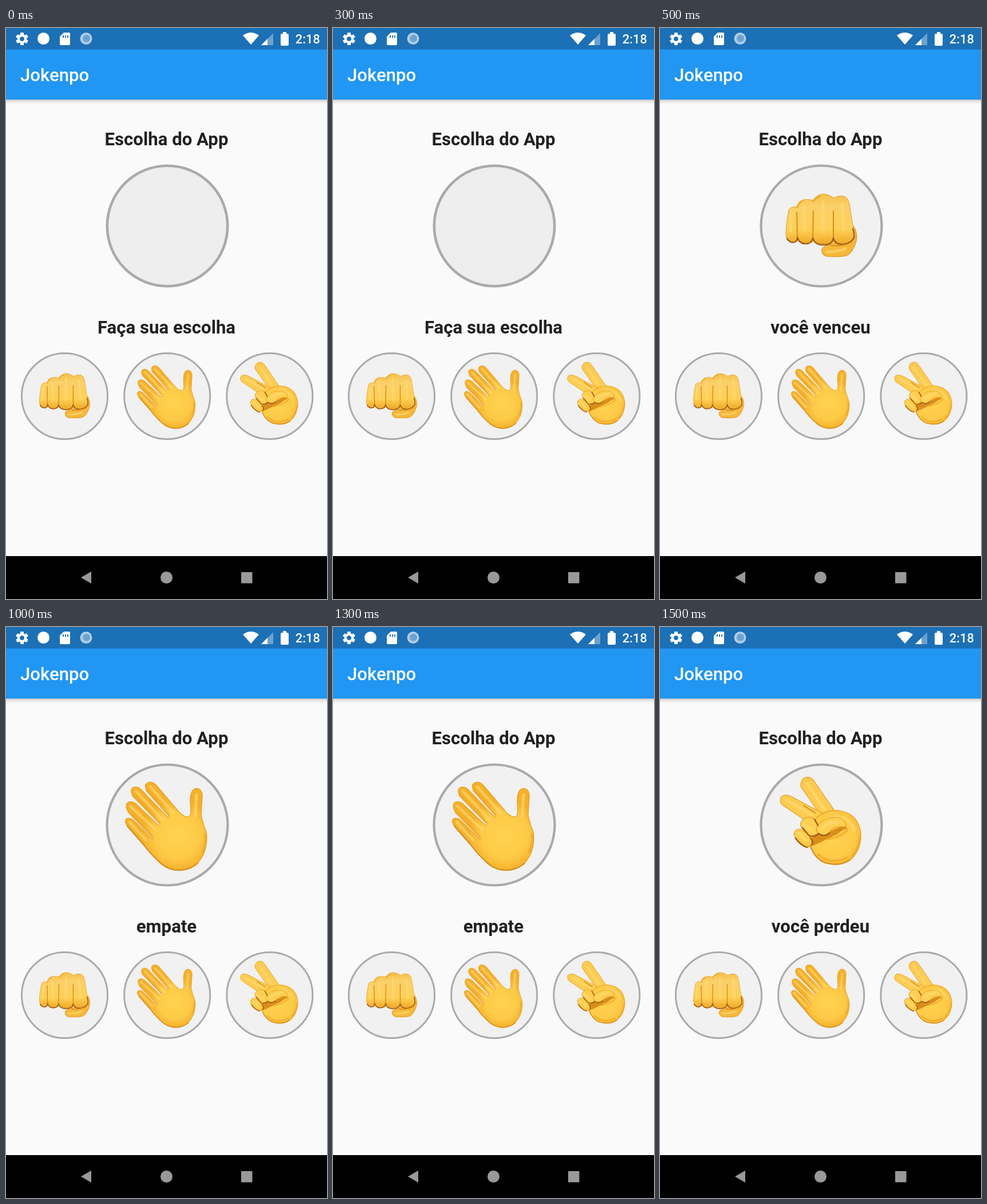
An HTML page that plays this animation: 561x998 px, repeating every 2 s.

```html
<!DOCTYPE html>
<html lang="pt">
<head>
<meta charset="utf-8">
<title>Jokenpo</title>
<style>
  html, body { margin: 0; width: 100%; height: 100%; overflow: hidden; background: #fafafa; }
  svg { display: block; }
  text { font-family: Roboto, sans-serif; }
  .heading { font-size: 31.17px; font-weight: 700; fill: #212121; text-anchor: middle; }
  .skin { fill: url(#skin); stroke: #e59d20; stroke-width: 1.2; stroke-linejoin: round; }
  .line { fill: none; stroke-linecap: round; stroke-linejoin: round; }
  .crease { stroke: #d78d1c; stroke-width: 2; }
  .dark { stroke: #a45f18; stroke-width: 2.4; }
  .glow { stroke: #ffdf7c; stroke-width: 5; opacity: .55; }
  .shade { stroke: #eda322; stroke-width: 4; opacity: .6; }
</style>
</head>
<body>
<svg width="561" height="998" viewBox="0 0 561 998">
  <defs>
    <linearGradient id="skin" gradientUnits="userSpaceOnUse" x1="0" y1="265" x2="0" y2="425">
      <stop offset="0" stop-color="#fbc950"/>
      <stop offset=".6" stop-color="#ffd052"/>
      <stop offset="1" stop-color="#f8b72c"/>
    </linearGradient>
    <linearGradient id="knuckle" x1="0" y1="0" x2="0" y2="1">
      <stop offset="0" stop-color="#f6c04a"/>
      <stop offset=".25" stop-color="#fbd068"/>
      <stop offset=".7" stop-color="#ffd056"/>
      <stop offset="1" stop-color="#eda625"/>
    </linearGradient>
    <radialGradient id="palm" gradientUnits="userSpaceOnUse" cx="300" cy="364" r="62">
      <stop offset="0" stop-color="#ffd34f"/>
      <stop offset=".65" stop-color="#fdca47"/>
      <stop offset="1" stop-color="#f5b02a"/>
    </radialGradient>
    <linearGradient id="drop" x1="0" y1="0" x2="0" y2="1">
      <stop offset="0" stop-color="#000" stop-opacity=".27"/>
      <stop offset=".4" stop-color="#000" stop-opacity=".1"/>
      <stop offset="1" stop-color="#000" stop-opacity="0"/>
    </linearGradient>

    <g id="ring">
      <circle cx="282" cy="346" r="105.5" fill="#f1f1f1" stroke="#aaa" stroke-width="4.2"/>
    </g>

    <g id="rock">
      <use href="#ring"/>
      <path d="M338 346Q346 358 343 372Q338 390 328 397Q320 401 290 399Q280 393 284 385Q288 380 300 378L326 368Z" fill="#f6b83a" stroke="#df941e" stroke-width="1.2"/>
      <path class="line glow" d="M292 391Q313 391 324 386"/>
      <path d="M240 313Q229 311 225 318Q220 345 220 358Q220 372 227 374Q237 377 241 370Q246 378 255 377Q264 377 268 372Q274 380 286 379Q299 379 303 374Q308 378 318 378Q336 377 339 367Q341 358 337 345L331 308Q329 296 321 294Q312 292 304 297Q296 291 286 290Q276 290 268 301Q258 299 251 300Q242 303 240 313Z" fill="url(#knuckle)" stroke="#e6a02a" stroke-width="1"/>
      <path class="line glow" d="M230 325L228 354M252 313L253 354M285 304V356M318 308L321 352"/>
      <path class="line crease" d="M239 322L240 367M268 320L267 369M303 320V371"/>
      <path class="line shade" d="M240 313Q242 305 248 303M268 303Q272 296 279 294"/>
      <path class="line dark" d="M222 368Q228 377 236 374Q240 372 240 366Q244 378 255 377Q265 377 267 367Q271 380 286 379Q301 379 303 367Q306 379 320 378Q334 376 339 367Q340 358 337 351"/>
      <path class="line crease" d="M335 374Q323 382 300 380"/>
    </g>

    <g id="paper">
      <use href="#ring"/>
      <path class="skin" style="fill:url(#palm)" d="M210 345Q206 335 214 334Q220 334 226 341L256 371Q259 370 256 366L213 322Q207 311 214 306Q221 304 227 309L267 347Q271 346 268 342L221 294Q216 284 223 280Q231 278 237 285L282 332Q286 332 284 328L245 285Q241 275 248 272Q256 269 263 277L303 324Q316 336 321 330Q324 326 322 308Q321 284 332 282Q344 282 343 298Q342 312 341 328Q343 340 350 358Q353 375 347 393Q336 420 312 425Q282 429 263 406Q250 393 238 377Z"/>
      <path class="line glow" d="M252 279L293 325M227 287L274 337M217 313L261 354M216 341L245 373M333 293L331 331"/>
      <path class="line crease" d="M212 348L240 380Q252 396 265 408Q283 426 305 425Q324 423 335 413"/>
      <path class="line shade" d="M348 362Q350 380 343 393M214 323L256 367M222 295L268 342M246 286L284 329" stroke-width="2"/>
    </g>

    <g id="scissors">
      <use href="#ring"/>
      <path class="skin" d="M246 279Q245 266 254 263Q263 260 270 270L305 321Q292 334 278 325Z"/>
      <path class="skin" d="M211 307Q208 296 217 294Q224 293 233 298L283 325L272 340L251 336L217 313Q213 311 211 307Z"/>
      <path class="skin" style="fill:url(#palm)" d="M276 331Q296 317 319 322Q347 329 351 360Q352 390 333 407Q315 420 290 413Q271 407 262 382L258 357Z"/>
      <path class="line glow" d="M257 274L287 318M222 303L266 328M305 331Q333 333 340 356"/>
      <path d="M270 354Q286 364 304 354Q324 344 327 352Q319 354 310 362Q294 369 277 378L260 385Z" fill="#d98e1c"/>
      <path class="line shade" d="M291 371Q318 367 328 354M276 397Q298 417 327 403M350 367Q347 388 336 400"/>
      <path class="skin" d="M246 348Q244 339 254 334Q263 330 270 336L281 352Q278 362 266 365L257 367Z"/>
      <path class="skin" d="M235 364Q233 355 243 353Q250 354 263 368Q269 375 264 381Q257 388 249 382Q237 375 235 364Z"/>
      <path class="skin" d="M274 350Q280 337 299 334Q319 329 325 344Q326 351 317 349Q304 348 297 358Q288 368 279 362Q271 357 274 350Z"/>
      <path class="line glow" d="M251 344L264 355M243 361L255 374M283 352Q291 342 311 340"/>
      <path class="line dark" d="M249 351L261 365Q272 368 277 361Q287 368 296 360M263 369Q269 376 265 381M270 336L276 347M237 369Q246 382 257 385"/>
      <path class="line crease" d="M264 386Q274 409 293 413Q316 418 331 407M271 325L251 312"/>
    </g>
  </defs>

  <rect width="561" height="998" fill="#fafafa"/>
  <rect y="124" width="561" height="9" fill="url(#drop)"/>
  <rect width="561" height="125" fill="#2196f3"/>
  <rect width="561" height="37.5" fill="#1c70b6"/>

  <g fill="#fff">
    <g id="gear" transform="translate(28 19)"></g>
    <circle cx="65.500" cy="18.500" r="10.500"/>
    <path d="M101 8H110Q112 8 112 10V28Q112 30 110 30H96Q94 30 94 28V15Z"/>
    <path d="M100 13V17M104 13V17M108 13V17" stroke="#1c70b6" stroke-width="2"/>
    <circle cx="140" cy="18.500" r="10.500" fill="#8fb9dc"/>
    <circle cx="140" cy="18.500" r="8.500" fill="none" stroke="#d5e5f2" stroke-width="3" stroke-dasharray="1.500 1.500"/>
    <circle cx="141" cy="18" r="6" fill="#6da3d0"/>
    <path d="M414 13Q428 3 442 13L428 29Z"/>
    <path d="M446 30L467 9V30Z" opacity=".35"/>
    <path d="M446 30L457 19V30Z"/>
    <path d="M484 7H490V10H492Q494 10 494 12V29Q494 31 492 31H482Q480 31 480 29V12Q480 10 482 10H484Z"/>
    <text x="548.800" y="27" font-size="21.800" font-weight="500" text-anchor="end">2:18</text>
    <text x="25" y="93" font-size="31.170" font-weight="500">Jokenpo</text>
  </g>

  <text class="heading" x="280.500" y="204.500">Escolha do App</text>
  <g id="scenes"></g>
  <g id="choices"></g>

  <rect y="923" width="561" height="75" fill="#000"/>
  <g fill="#999">
    <path d="M131 960.500L149 950V971Z"/>
    <circle cx="280.500" cy="960.500" r="10.500"/>
    <rect x="411" y="951" width="19.500" height="19.500" rx="1"/>
  </g>
</svg>
<script>
const STEP = 500;
const SCENES = [
  ["Faça sua escolha", null],
  ["você venceu", "rock"],
  ["empate", "paper"],
  ["você perdeu", "scissors"],
];
const LOOP = STEP * SCENES.length;

function add(parent, tag, attrs, text = "") {
  const el = document.createElementNS("http://www.w3.org/2000/svg", tag);
  for (const key in attrs) el.setAttribute(key, attrs[key]);
  el.textContent = text;
  return parent.appendChild(el);
}

const gear = document.getElementById("gear");
for (let a = 0; a < 360; a += 60)
  add(gear, "rect", { x: -3, y: -11, width: 6, height: 7, rx: 1, transform: `rotate(${a})` });
add(gear, "circle", { r: 6, fill: "none", stroke: "#fff", "stroke-width": 4.5 });
add(gear, "circle", { r: 3.8, fill: "#1c70b6" });

const scenes = document.getElementById("scenes");
SCENES.forEach(([caption, hand], i) => {
  const g = add(scenes, "g", {});
  if (hand) add(g, "use", { href: "#" + hand });
  else add(g, "circle", { cx: 282, cy: 346, r: 105.2, fill: "#eee", stroke: "#aaa", "stroke-width": 4.6 });
  add(g, "text", { class: "heading", x: 280.5, y: 533.5 }, caption);
  const offset = 1 / SCENES.length;
  g.animate(
    [{ opacity: 1 }, { opacity: 1, offset }, { opacity: 0, offset }, { opacity: 0 }],
    { duration: LOOP, delay: i * STEP - LOOP, iterations: Infinity }
  );
});

const choices = document.getElementById("choices");
["rock", "paper", "scissors"].forEach((hand, i) => {
  const x = 102.5 + i * 179.2;
  add(choices, "use", {
    href: "#" + hand,
    transform: `translate(${x} 643.500) scale(.7116) translate(-282 -346)`,
  });
});
</script>
</body>
</html>
```
